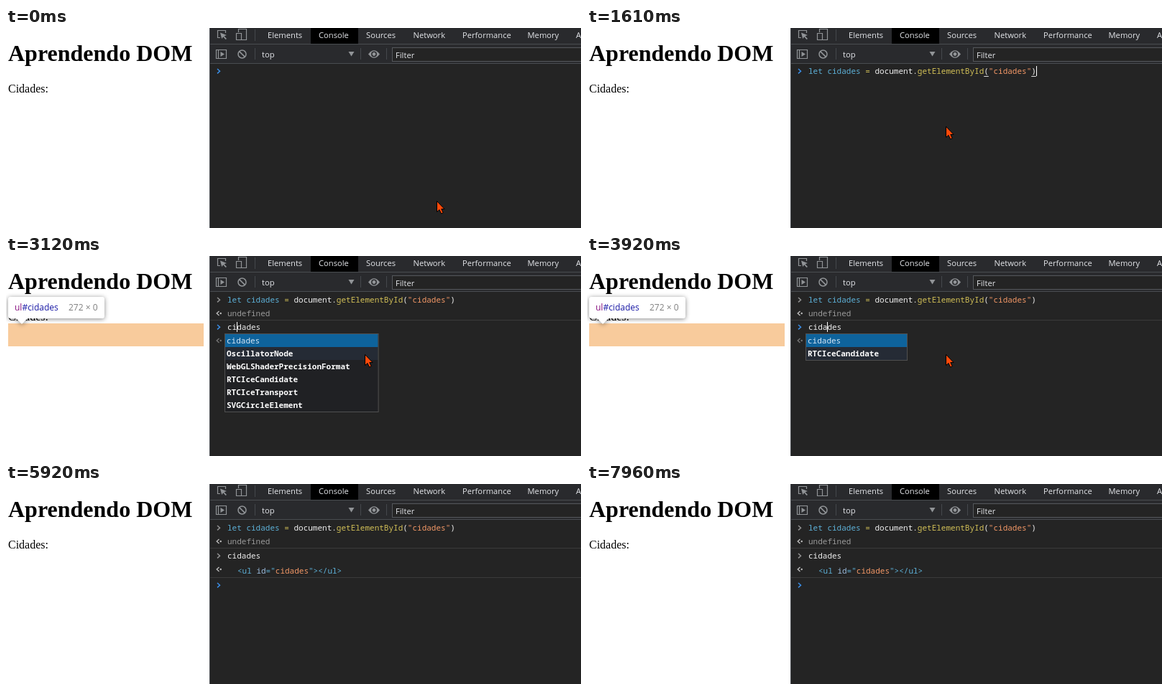
An HTML page for the animation above (8 s loop, 800 by 279 pixels).

```html
<!DOCTYPE html>
<html lang="pt">
<head>
<meta charset="utf-8">
<title>Aprendendo DOM</title>
<style>
  html, body { margin: 0; width: 100%; height: 100%; overflow: hidden; background: #fff; }
  svg { display: block; width: 800px; height: 279px; }
  text { white-space: pre; }
  .page { font-family: "Liberation Serif", serif; fill: #000; }
  .ui { font: 11.2px "Open Sans", sans-serif; fill: #e4e6ea; }
  .code { font: 11px "Noto Sans Mono", monospace; }
  .bold { font-weight: bold; }
  .icon { fill: none; stroke: #919497; stroke-width: 1.2; }
  .tip { font: 12px "Open Sans", sans-serif; }
</style>
</head>
<body>
<svg viewBox="0 0 800 279">
  <rect width="800" height="279" fill="#fff"/>
  <text class="page" x="3" y="46" font-size="32" font-weight="bold">Aprendendo DOM</text>
  <text class="page" x="3" y="90" font-size="16">Cidades:</text>
  <g id="overlay">
    <rect x="3" y="94" width="272" height="32" fill="#f8cb9c"/>
    <g style="filter:drop-shadow(0 1px 3px #0007)">
      <path d="M6 57H134q3 0 3 3V84q0 3-3 3H30l-8 8l-8-8H6q-3 0-3-3V60q0-3 3-3z" fill="#fff"/>
    </g>
    <text class="tip bold" x="12" y="76" fill="#881280">ul<tspan fill="#1a1aa6">#cidades</tspan></text>
    <text class="tip" x="87" y="76" fill="#808080">272 × 0</text>
  </g>

  <rect x="283" width="517" height="279" fill="#242424"/>
  <rect x="284" width="516" height="50" fill="#292a2d"/>
  <path d="M283.5 0V279M284 22.5H800M284 49.5H800" stroke="#494c50"/>
  <path d="M346.5 2V18M346.5 28V44M493.5 28V44M529.5 28V44" stroke="#45484c"/>
  <rect x="424" width="66" height="22" fill="#000"/>
  <g id="tabs" class="ui"></g>
  <g class="icon">
    <path d="M298 13.5H294.5V3.5H305.5V7"/>
    <path d="M298 6.5L307 10L303.5 11.2L307 15L305.5 16L302.3 12.3L300.2 15Z" fill="#919497" stroke="none"/>
    <path d="M323.5 6V1.500H334.500V16.500H328M320.500 7.500H327.500V16.500H320.500Z"/>
    <path d="M292.5 30.500H306.500V42.500H292.500ZM295.500 30.500V42.500"/>
    <path d="M298.500 33L304 36.500L298.500 40Z" fill="#919497" stroke="none"/>
    <circle cx="328.500" cy="36.500" r="5.500" stroke-width="1.500"/>
    <path d="M324.600 32.600L332.400 40.400" stroke-width="1.500"/>
    <path d="M504 36.500Q512 26 520 36.500Q512 47 504 36.500Z" fill="#919497" stroke="none"/>
    <circle cx="512" cy="36.500" r="3.200" fill="#919497" stroke="#292a2d" stroke-width="1.500"/>
    <path d="M476.500 33H484.500L480.500 39.500Z" fill="#919497" stroke="none"/>
  </g>
  <rect x="537.5" y="27.500" width="270" height="19" fill="#242424" stroke="#55585c"/>
  <text class="ui" x="356" y="41">top</text>
  <text class="ui" x="542" y="42">Filter</text>

  <g id="console"></g>
  <path id="mouse" d="M0 0V15L3.500 12L6 17.500L8.700 16.300L6.300 11H10.500Z" fill="#ff4a0a" stroke="#000"/>
</svg>
<script>
const LOOP = 8000, CHAR = 6.6, LEFT = 308;
const BLUE = '#5db0d7', YELLOW = '#d2c057', ORANGE = '#f29766', WHITE = '#eee', GREY = '#919191', PROMPT = '#3b8ee6';
const $ = id => document.getElementById(id);
const escapeText = s => s.replace(/&/g, '&amp;').replace(/</g, '&lt;');

const tabs = { Elements: 364, Console: 435, Sources: 501, Network: 566.5, Performance: 635, Memory: 725.5, Application: 793 };
$('tabs').innerHTML = Object.entries(tabs).map(([name, x]) => `<text x="${x}" y="14">${name}</text>`).join('');

const FOCUS = 900, PASTE = 1250, RUN = 2000, SUBMIT = 5350, BLUR = 6780;
const keyTimes = [2780, 2960, 3450, 3850, 4240, 4600, 5000];
const word = 'cidades';
const candidates = [word, 'OscillatorNode', 'WebGLShaderPrecisionFormat', 'RTCIceCandidate', 'RTCIceTransport', 'SVGCircleElement'];
const statement = [['let', BLUE], [' cidades', BLUE], [' = ', YELLOW], ['document.', WHITE],
  ['getElementById', YELLOW], ['(', WHITE], ['"cidades"', ORANGE], [')', WHITE]];
const element = [['<ul ', BLUE], ['id', '#9bbbdc'], ['="', BLUE], ['cidades', ORANGE], ['"></ul>', BLUE]];

const code = (x, y, parts, cls = '') => `<text class="code ${cls}" x="${x}" y="${y}">` +
  parts.map(([s, color]) => `<tspan fill="${color}">${escapeText(s)}</tspan>`).join('') + '</text>';
const chevron = (y, color) =>
  `<path d="M294 ${y - 3}l3.500 3.200l-3.500 3.200" fill="none" stroke="${color}" stroke-width="1.500"/>`;
const resultMark = (y, color) =>
  `<path d="M296.500 ${y - 3}l-3.300 3l3.300 3" fill="none" stroke="${color}" stroke-width="1.300"/>` +
  `<circle cx="298.700" cy="${y}" r="1.200" fill="${color}"/>`;
const divider = y => `<path d="M284 ${y}H800" stroke="#3a3a3a"/>`;
const caretAt = (column, y) => `<rect x="${Math.round(LEFT + column * CHAR)}" y="${y - 7}" width="1" height="14" fill="#fff"/>`;

// Completion keeps names that contain the typed letters in order.
const matches = typed => candidates.filter(name => new RegExp([...typed].join('.*'), 'i').test(name));

function popup(names) {
  const width = Math.max(...names.map(n => n.length)) * CHAR + 42;
  const rows = names.map((name, i) => {
    const y = 109 + i * 18;
    const fill = ['#0e639c', '#252b35'][i] || '#202124';
    return `<rect x="305" y="${y}" width="${width - 1}" height="18" fill="${fill}"/>` +
      code(307, y + 13, [[name, i ? '#fff' : '#d5e6f5']], i ? 'bold' : '');
  });
  return rows.join('') +
    `<rect x="304.500" y="108.500" width="${width}" height="${names.length * 18 + 1}" fill="none" stroke="#505050"/>`;
}

function consoleView(t) {
  const typed = keyTimes.filter(k => k <= t).length;
  const lastEvent = Math.max(...[FOCUS, PASTE, RUN, ...keyTimes, SUBMIT].filter(k => k <= t));
  const caretOn = t >= FOCUS && t < BLUR && (t - lastEvent) % 1060 < 530;
  const caret = (column, y) => caretOn ? caretAt(column, y) : '';

  if (t < RUN) {
    if (t < PASTE) return chevron(60, PROMPT) + caret(0, 60);
    const underline = column => `<rect x="${LEFT + column * CHAR}" y="67" width="6.600" height="1" fill="#ddd"/>`;
    return chevron(60, PROMPT) + code(LEFT, 64, statement) + underline(37) + underline(47) + caret(48, 60);
  }

  const history = chevron(61, GREY) + code(LEFT, 65, statement) +
    resultMark(80, '#c0c0c0') + code(LEFT, 84, [['undefined', '#999']]) + divider(89.5);

  if (t >= SUBMIT) {
    return history + chevron(100, GREY) + code(LEFT, 104, [[word, WHITE]]) +
      resultMark(119, '#c0c0c0') + code(322, 125, element) + divider(130.5) +
      chevron(141, PROMPT) + caret(0, 141);
  }
  if (!typed) return history + chevron(99, PROMPT) + caret(0, 99);

  const names = matches(word.slice(0, typed));
  return history + chevron(99, PROMPT) + code(LEFT, 103, [[word, WHITE]]) + caret(typed, 99) +
    resultMark(118, '#777') + code(LEFT, 122, [['ul', '#43738a'], ['#cidades', '#9b6a4c']]) +
    (names.length > 1 ? popup(names) : '');
}

let shown;
function draw(now) {
  const t = now % LOOP;
  const view = consoleView(t);
  if (view !== shown) $('console').innerHTML = shown = view;

  $('overlay').style.display = t >= keyTimes[0] && t < SUBMIT ? '' : 'none';

  const p = Math.min(1, Math.max(0, (t - 70) / 730));
  const eased = p * p * (3 - 2 * p);
  $('mouse').setAttribute('transform', `translate(${599.5 - 100 * eased} ${241.5 - 104 * eased})`);
  $('mouse').style.display = t < SUBMIT ? '' : 'none';
}

const start = performance.now();
function tick() {
  draw(performance.now() - start);
  requestAnimationFrame(tick);
}
tick();
</script>
</body>
</html>
```
